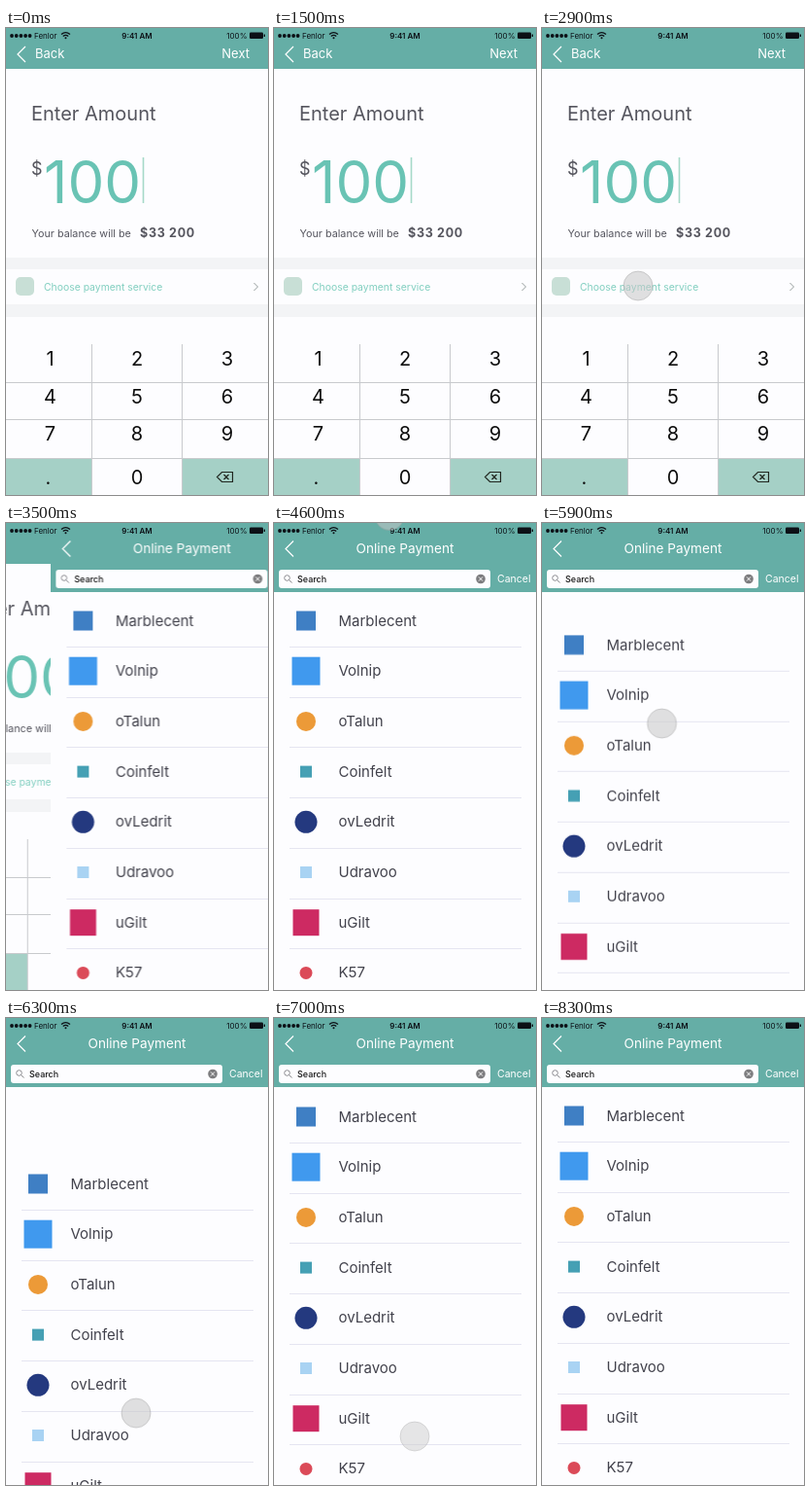
Recreate the animation shown at these times as an HTML page. Size 270 by 480 pixels, loop 8.4 s.

```html
<!DOCTYPE html>
<html lang="en">
<head>
<meta charset="utf-8">
<title>Payment flow</title>
<style>
  html, body { margin: 0; height: 100%; overflow: hidden; background: #fdfdff; }
  svg { display: block; width: 100%; height: 100%; font-family: Inter, Roboto, sans-serif; }
  .paper { fill: #fdfdff; }
  .bar { fill: #65aea6; }
  .band { fill: #f3f4f6; }
  .nav { font-size: 13px; fill: #fff; }
  .line { fill: none; stroke: #fff; stroke-width: 1.2; }
  .ink { fill: #55555e; }
  .mid { text-anchor: middle; }
  .end { text-anchor: end; }
  .grid { stroke: #c8cacd; stroke-width: 1; }
  .key { font-size: 20px; fill: #0d0d0d; text-anchor: middle; }
  .row { font-size: 15px; fill: #42424c; }
  .rule { stroke: #e5e5f1; }
  .status { font-size: 8px; fill: #0c1016; }

  .amount, .list, .scroll, .touch { animation: 8.4s linear infinite; }
  .amount { animation-name: leave; }
  .list { animation-name: enter; }
  .scroll { animation-name: scroll; }
  .touch { animation-name: touch; fill: rgba(198, 198, 198, .55); stroke: rgba(150, 150, 150, .4); }

  /* Percentages are time in ms / 84 */
  @keyframes leave {
    0%, 39.286% { transform: translateX(0); animation-timing-function: cubic-bezier(.2, .7, .2, 1); }
    46.429%, 100% { transform: translateX(-80px); }
  }
  @keyframes enter {
    0%, 39.286% { transform: translateX(270px); animation-timing-function: cubic-bezier(.2, .7, .2, 1); }
    46.429%, 100% { transform: translateX(0); }
  }
  @keyframes scroll {
    0%, 59.524% { transform: translateY(0); animation-timing-function: ease-out; }
    64.286% { transform: translateY(-142px); }
    65.476% { transform: translateY(-137px); }
    68.81% { transform: translateY(0); animation-timing-function: ease-out; }
    75%, 76.19% { transform: translateY(70px); animation-timing-function: cubic-bezier(.15, .75, .3, 1); }
    83.333% { transform: translateY(1px); }
    84.524%, 100% { transform: translateY(0); }
  }
  @keyframes touch {
    0%, 32.143% { transform: translate(99px, 265px); opacity: 0; }
    33.333%, 36.905% { transform: translate(99px, 265px); opacity: 1; }
    38.095% { transform: translate(99px, 265px); opacity: 0; }
    53.571% { transform: translate(120px, -20px); opacity: 0; }
    54.762% { transform: translate(119px, -8px); opacity: 1; }
    59.524% { transform: translate(118px, 180px); opacity: 1; animation-timing-function: ease-out; }
    64.286% { transform: translate(113px, 0); opacity: 1; }
    65.476% { transform: translate(113px, 5px); opacity: 1; }
    75% { transform: translate(134px, 406px); opacity: 1; animation-timing-function: ease-out; }
    82.143% { transform: translate(145px, 430px); opacity: 1; }
    83.333% { transform: translate(145px, 430px); opacity: .8; }
    85.714%, 100% { transform: translate(145px, 430px); opacity: 0; }
  }
</style>
</head>
<body>
<svg viewBox="0 0 270 480">
  <defs>
    <clipPath id="view"><rect y="71" width="270" height="409"/></clipPath>
  </defs>

  <g class="amount">
    <rect class="paper" width="270" height="480"/>
    <rect class="bar" width="270" height="42"/>
    <path class="line" d="M20 19l-8 8 8 8"/>
    <text class="nav" x="30" y="31">Back</text>
    <text class="nav end" x="251" y="31">Next</text>

    <text class="ink" x="26" y="95" font-size="20">Enter Amount</text>
    <text class="ink" x="26" y="151" font-size="18">$</text>
    <text x="39" y="180" font-size="60" fill="#69c3b4">100</text>
    <path d="M141.5 133v47" stroke="#a5d9c8" stroke-width="1.6"/>
    <text class="ink" x="26.5" y="215" font-size="10.8">Your balance will be</text>
    <text class="ink" x="138" y="215" font-size="12.5" font-weight="700" letter-spacing=".7">$33 200</text>

    <rect class="band" y="236" width="270" height="12"/>
    <rect class="band" y="284" width="270" height="13"/>
    <rect x="10" y="256" width="19" height="19" rx="5" fill="#c8dfd6"/>
    <text x="39" y="270" font-size="10.4" fill="#82cfc0">Choose payment service</text>
    <path d="M255.5 262l4 4-4 4" fill="none" stroke="#949c9c"/>

    <g fill="#a5d0c6">
      <rect y="442" width="88" height="38"/>
      <rect x="182" y="442" width="88" height="38"/>
    </g>
    <path class="grid" d="M88.5 325V480M181.5 325V480M0 364.5H270M0 402.5H270M0 442.5H270"/>
    <g id="keys"></g>
    <path d="M222.5 456.500h11v10h-11l-5-5zM224.500 459l5 5m0-5l-5 5" fill="none" stroke="#20261f" stroke-width="1.2"/>
  </g>

  <g class="list">
    <rect class="paper" width="270" height="480"/>
    <g clip-path="url(#view)"><g class="scroll" id="rows"></g></g>
    <rect class="bar" width="270" height="71"/>
    <path class="line" d="M20 18.5l-8 8 8 8"/>
    <text class="nav mid" x="135" y="31" style="font-size:13.6px">Online Payment</text>
    <rect class="paper" x="5" y="48" width="218" height="19" rx="3"/>
    <g fill="none" stroke="#8b8b90">
      <circle cx="13.5" cy="56.5" r="2.8"/>
      <path d="M15.5 58.5l3 3"/>
    </g>
    <text x="24" y="61" font-size="9" font-weight="500" fill="#181818">Search</text>
    <circle cx="213" cy="57.5" r="4.8" fill="#7c7c7e"/>
    <path d="M211 55.5l4 4m0-4l-4 4" stroke="#fff"/>
    <text class="nav" x="230" y="61" style="font-size:10.5px">Cancel</text>
  </g>

  <g class="status">
    <g id="signal"></g>
    <text x="29" y="10.5">Fenlor</text>
    <path d="M57 6.5q4.500-3.800 9 0M58.800 8.500q2.700-2.300 5.400 0" fill="none" stroke="#0c1016" stroke-width="1.3"/>
    <circle cx="61.5" cy="10.2" r="1"/>
    <text class="mid" x="135" y="10.5" font-weight="600">9:41 AM</text>
    <text class="end" x="248.500" y="10.5">100%</text>
    <rect x="251" y="4.5" width="14" height="6.5" rx="1.2"/>
    <rect x="265.7" y="6.5" width="1.3" height="2.5"/>
  </g>

  <circle class="touch" r="15"/>
</svg>
<script>
  const fill = (id, items, draw) =>
    document.getElementById(id).innerHTML = items.map(draw).join('');

  const columns = [45.5, 135, 228];
  const baselines = [346.5, 385.5, 424, 468.5];
  fill('keys', [...'123456789.0'], (key, i) =>
    `<text class="key" x="${key === '.' ? 43.5 : columns[i % 3]}" y="${baselines[Math.floor(i / 3)]}">${key}</text>`);

  fill('signal', [6, 10.7, 15.4, 20.1, 24.6], x => `<circle cx="${x}" cy="8" r="1.9"/>`);

  // name, badge colour, badge size, round badge
  const services = [
    ['Marblecent', '#3f7fc4', 20],
    ['Volnip', '#4099ee', 29],
    ['oTalun', '#ec9a38', 20, true],
    ['Coinfelt', '#45a0b4', 12],
    ['ovLedrit', '#24397f', 23, true],
    ['Udravoo', '#a9d3f3', 12],
    ['uGilt', '#cd2a62', 27],
    ['K57', '#db4a58', 13, true],
    ['Vozi', '#f59b22', 26, true],
    ['Lentadue', '#2f7fae', 12]
  ];
  fill('rows', services, ([name, color, size, round], i) => {
    const y = 100.5 + i * 51.7;
    const rule = i < services.length - 1
      ? `<path class="rule" d="M16 ${Math.floor(y + 27) + .5}H255"/>` : '';
    return `<rect x="${33 - size / 2}" y="${y - size / 2}" width="${size}" height="${size}"
        rx="${round ? size / 2 : 0}" fill="${color}"/>
      <text class="row" x="66.5" y="${y + 5}">${name}</text>${rule}`;
  });
</script>
</body>
</html>
```
